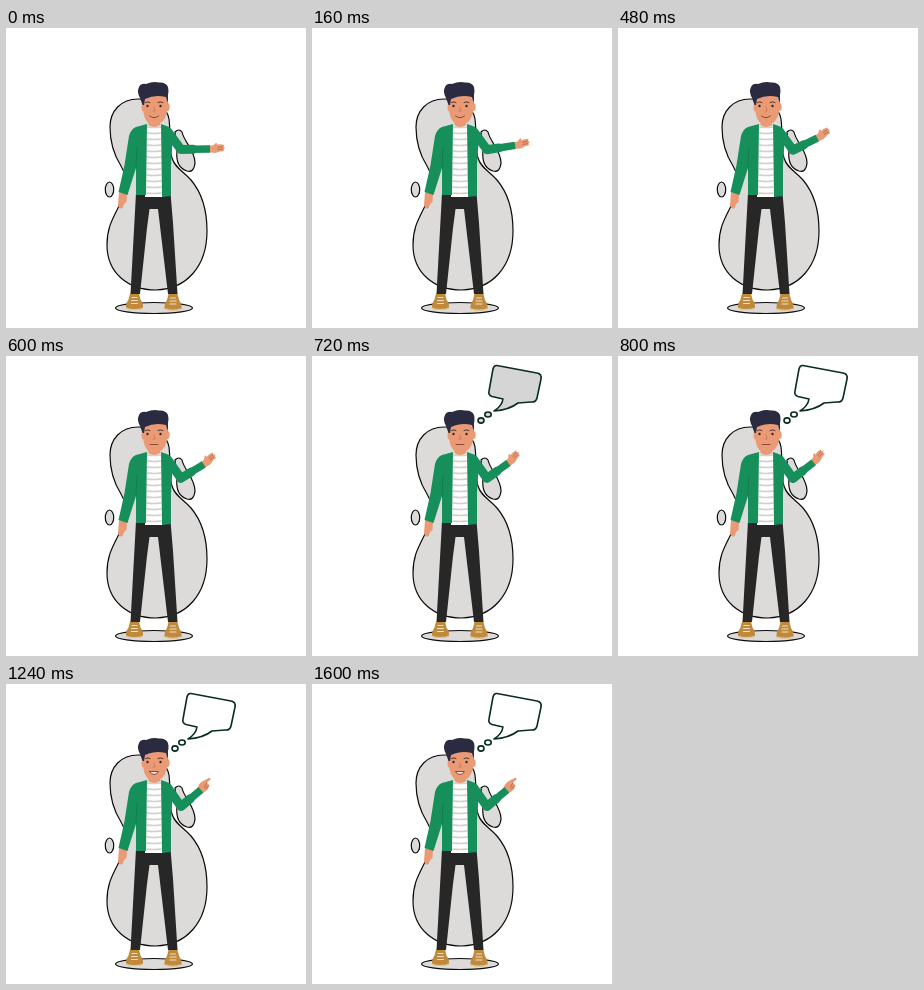
An HTML page that plays this animation: 300 px wide and 300 px high, repeating every 2.04 s.

```html
<!DOCTYPE html>
<html>
<head>
<meta charset="utf-8">
<style>
html, body { margin: 0; height: 100%; overflow: hidden; background: #fff; }
svg { display: block; width: 100vw; height: 100vh; }
.blob { fill: #dcdbd9; stroke: #0c0c0c; stroke-width: 1.2; }
.skin { fill: #ea9a75; }
.green { fill: #168f5b; }
.line { fill: none; stroke-linecap: round; stroke-linejoin: round; }
</style>
</head>
<body>
<svg viewBox="0 0 300 300">
  <defs>
    <g id="shoe">
      <path d="M-4.500-8H4.500L6-2Q9 2 8.500 7Q0 10-8.500 7Q-9 2-6-2Z" fill="#c08a3c"/>
      <path d="M-8.500 6Q0 9 8.500 6V7.500Q0 10-8.500 7.500Z" fill="#e0c79c"/>
      <path class="line" d="M-2.500-4H2.500M-3-1H3M-3 2H3" stroke="#f0dfc4" stroke-width="1.200"/>
    </g>
  </defs>

  <g class="blob">
    <path d="M132 71C115 71 104 83 104 99C104 114 108 127 115 138C122 150 121 162 113 178C106 192 101 200 101 217C101 245 122 262 150 262C181 261 201 238 201 203C201 182 196 165 185 152C177 143 169 140 166 130C162 118 165 106 163 91C161 79 148 71 132 71Z"/>
    <path d="M169 104Q173 100 176 104C178 114 189 122 189 135Q188 145 181 143C172 140 170 132 171 123Z"/>
    <ellipse cx="103.500" cy="161.500" rx="4.200" ry="7.500"/>
    <ellipse cx="148" cy="280" rx="38.500" ry="5.500"/>
  </g>

  <use href="#shoe" x="128.500" y="273.500"/>
  <use href="#shoe" x="167" y="274"/>
  <path d="M130 165H164.500L167 195L171.500 266H162L152 181H143.500L141 200L134 266H124.500Z" fill="#272728"/>

  <path class="skin" d="M113 164L121 166L120.500 174Q117 176 117 180Q113 182 112 177Z"/>
  <path d="M139 97Q148 101 157 97V169H139Z" fill="#fff"/>
  <path id="stripes" class="line" stroke="#d3cfc9" stroke-width="1.600"/>
  <path class="skin" d="M142.500 90H154V97Q148 101 142.500 97Z"/>
  <path class="green" d="M141 96L130 99Q125 101 123 108L118.500 137L112.500 164L121.500 167L130 140V167H140Z"/>
  <path class="green" d="M155 96L162 98.500Q166 101 167 107L165 137V168L156 169Z"/>
  <path class="line" d="M130 140L131 119" stroke="#10784c" stroke-width=".7"/>

  <g id="hand" class="skin">
    <g id="open">
      <path d="M-3-3.500L3-3.500L6-6Q8-6 7-4L10-4.500L14-4Q15-2.500 13-2L15-1Q15 .5 13 .5L14 2Q13 3 11 2.500L5 4L-3 3Z"/>
      <path class="line" d="M8-1.500L13-2M8 .5H13" stroke="#a85f45" stroke-width=".7"/>
    </g>
    <g id="point">
      <path d="M-3-3L3-5L7-4.500L14-2Q16-.5 14 .5L9 0L9 3.500Q6 5.500 2 4.500L-3 3Z"/>
      <path class="line" d="M4 1L9 0M4 3L8 3" stroke="#a85f45" stroke-width=".8"/>
    </g>
  </g>
  <path id="arm" class="line" stroke="#168f5b" stroke-width="9"/>
  <path id="cuff" class="line" style="stroke-linecap:butt" stroke="#168f5b" stroke-width="7.500"/>

  <ellipse class="skin" cx="137.500" cy="79.500" rx="2" ry="4"/>
  <ellipse class="skin" cx="161.500" cy="79" rx="2.200" ry="4"/>
  <path class="skin" d="M137.500 67H161V84Q159 96 148.500 97Q139 96 137.500 85Z"/>
  <path d="M136.500 77L134 70Q130.500 64 133 59Q135 55 140 56Q147 53 153 54.500Q160 54 162 59Q163 63 162 67V76L160 69Q149 66 139 71L138 77Z" fill="#2a2a40"/>
  <path class="line" d="M139.500 74.500Q142 73 144 74.500M152 74.500Q155 73 157 74.500" stroke="#4a3535" stroke-width="1"/>
  <circle cx="141.500" cy="78" r="1.200" fill="#332a30"/>
  <circle cx="154.500" cy="78" r="1.200" fill="#332a30"/>
  <path class="line" d="M148 79L149 83H147" stroke="#c9744f" stroke-width=".8"/>
  <path id="mouth" class="line" stroke="#8a4a3a" stroke-width="1"/>

  <g id="bubble" stroke="#0b2c20" stroke-width="1.600" stroke-linejoin="round">
    <path d="M185 9.500L225 17Q230 18 229 23L225 42Q224 46.500 219 46L206 47Q197 54 182 55Q190 50 191 43L180 40.500Q176 39 177 35L181 13Q182 9 185 9.500Z"/>
    <ellipse cx="176" cy="58.500" rx="3.200" ry="2.500"/>
    <ellipse cx="169" cy="64.500" rx="3" ry="2.600"/>
  </g>
</svg>
<script>
const $ = id => document.getElementById(id);
const set = (id, name, value) => $(id).setAttribute(name, value);
const show = (id, on) => set(id, "visibility", on ? "visible" : "hidden");
const clamp = v => Math.max(0, Math.min(1, v));
const LOOP = 2040, STEP = 40;

let d = "";
for (let y = 99; y < 168; y += 6) d += `M141 ${y}Q148 ${y + 1} 155 ${y}`;
set("stripes", "d", d);

function draw(ms) {
  const t = Math.floor(ms % LOOP / STEP) * STEP;
  const k = 1 - (1 - clamp((t - 40) / 880)) ** 1.5;

  // the forearm swings up about the elbow, foreshortening a little
  const deg = -1 - 39 * k, a = deg * Math.PI / 180;
  const ex = 175, ey = 121.5 + k, len = 29 - 3 * k;
  const at = r => `${ex + r * Math.cos(a)} ${ey + r * Math.sin(a)}`;
  set("arm", "d", `M162 104L${ex} ${ey}L${at(12)}`);
  set("cuff", "d", `M${at(10)}L${at(len)}`);
  set("hand", "transform", `translate(${at(len)}) rotate(${deg - 9 * k})`);

  const pointing = t >= 840;
  show("open", !pointing);
  show("point", pointing);

  set("mouth", "d", t < 600 ? "M143.500 88Q148 91.500 152.500 88"
    : pointing ? "M143.500 87.500H152.500Q151 90.500 148 90.500Q145 90.500 143.500 87.500Z"
    : "M144 88.500H152");
  set("mouth", "style", pointing ? "fill:#f3e4dc" : "");

  // the bubble brightens from grey to white
  const glow = clamp((t - 520) / 240), g = Math.round(255 * glow);
  show("bubble", glow >= .5);
  set("bubble", "fill", `rgb(${g},${g},${g})`);
}

let start;
function tick(now) {
  start ??= now;
  draw(now - start);
  requestAnimationFrame(tick);
}
draw(0);
requestAnimationFrame(tick);
</script>
</body>
</html>
```
